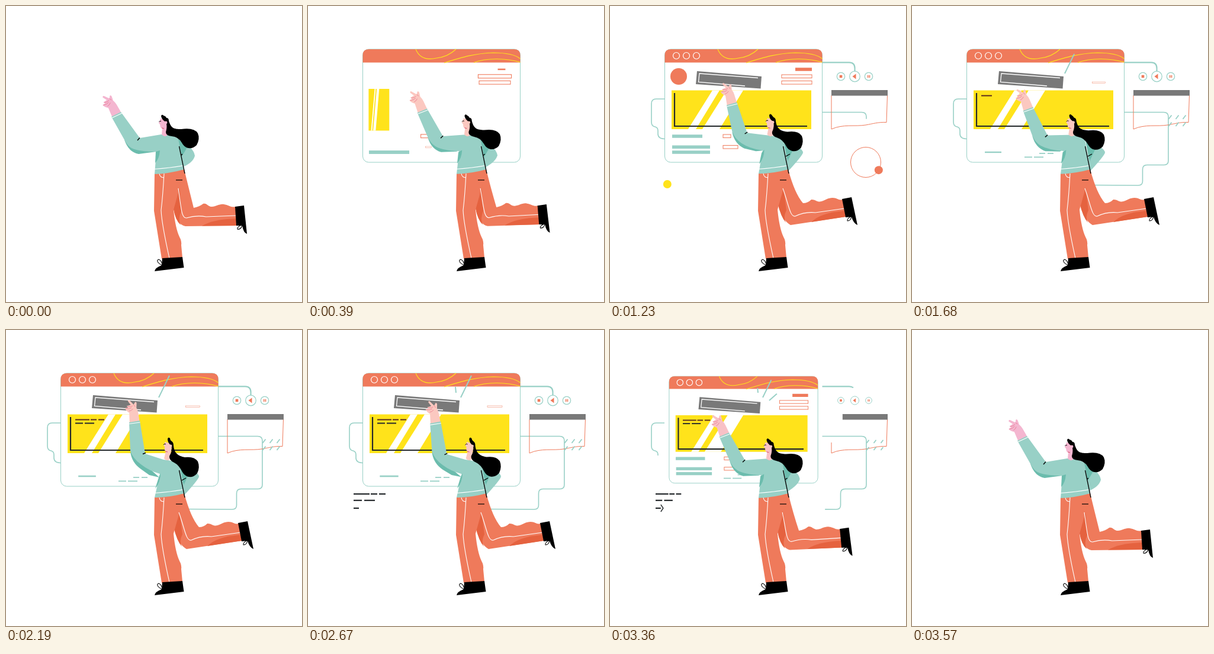
Recreate the animation shown at these times as an HTML page. Size 500 by 500 pixels, loop 3630 ms.

```html
<!DOCTYPE html>
<html lang="en">
<head>
<meta charset="utf-8">
<title>Page builder</title>
<style>
html, body { margin: 0; width: 100%; height: 100%; overflow: hidden; background: #fff; }
svg { display: block; width: 100vw; height: 100vh; }
</style>
</head>
<body>
<svg id="stage" viewBox="0 0 500 500" fill="none"></svg>
<script>
const LOOP = 3630, STEP = 30;
const ORANGE = '#ef7a5b', RUST = '#e5623f', TEAL = '#98d0c6', DEEP = '#6bbcad',
  YELLOW = '#ffe31b', GREY = '#797979', INK = '#24282b';
const stage = document.getElementById('stage');

// Timing
const clamp = x => Math.max(0, Math.min(1, x));
const mix = (a, b, p) => a + (b - a) * p;
const span = (t, a, b) => clamp((t - a) / (b - a));
const smooth = (t, a, b) => { const x = span(t, a, b); return x * x * (3 - 2 * x); };
const pop = (t, start, dur = 200) => {
  const x = span(t, start, start + dur) - 1;
  return x <= -1 ? 0 : 1 + 2.7 * x ** 3 + 1.7 * x ** 2;
};
const leave = (t, start = 3300) => 1 - smooth(t, start, start + 210);
const keys = (t, list) => {
  let i = 0;
  while (i < list.length - 2 && t >= list[i + 1][0]) i++;
  const [a, b] = [list[i], list[i + 1]];
  return mix(a[1], b[1], smooth(t, a[0], b[0]));
};
// Page widgets pop up, fold away, and pop up again
const pulse = (t, start, rest = 0) => {
  const back = pop(t, start + 2748);
  const first = pop(t, start) * (1 - smooth(t, 1260, 1560));
  return Math.max(first, back, t > 1260 ? rest : 0);
};

// Drawing
const fill = (d, c) => `<path d="${d}" fill="${c}"/>`;
const line = (d, c, w = 1.1, p = 1) => p <= 0 ? '' :
  `<path d="${d}" stroke="${c}" stroke-width="${w}"` +
  (p < 1 ? ` pathLength="1" stroke-dasharray="${p} 2"` : '') + '/>';
const dot = (x, y, r, attrs) => r <= 0 ? '' : `<circle cx="${x}" cy="${y}" r="${r}" ${attrs}/>`;
const scaled = (x, y, sx, sy, body) => sx <= 0.001 || sy <= 0.001 ? '' :
  `<g transform="translate(${x} ${y}) scale(${sx} ${sy}) translate(${-x} ${-y})">${body}</g>`;
const bar = (cx, cy, w, h, s, attrs) => scaled(cx, cy, s, s,
  `<rect x="${cx - w / 2}" y="${cy - h / 2}" width="${w}" height="${h}" ${attrs}/>`);
const morph = (a, b, p) => {
  const to = b.match(/-?\d+(\.\d+)?/g);
  let i = 0;
  return a.replace(/-?\d+(\.\d+)?/g, n => mix(+n, +to[i++], p).toFixed(2));
};
// Dashes typed one after another: [x1, x2] pairs on a row
const typed = (y, dashes, p, c, w) => dashes.map(([a, b], i) => {
  const q = clamp(p * dashes.length - i);
  return q ? line(`M${a},${y}H${mix(a, b, q)}`, c, w) : '';
}).join('');

function header(t) {
  const lights = [112, 129, 146].map((x, i) =>
    dot(x, 84, 5.5 * pop(t, 430 + i * 60), 'stroke="#fff" stroke-width="1.2"')).join('');
  return fill('M92.5,95.5V83Q92.5,73 102.5,73H348.5Q358.5,73 358.5,83V95.5Z', ORANGE) +
    line('M182,73C189,90 204,91 217,88Q236,86 250,73', YELLOW) +
    line('M230,96C262,86 282,80 313,79Q346,79 358.5,89', YELLOW) +
    line('M280,95.5C302,87 336,88 358.5,95', YELLOW) + lights;
}

function banner(t) {
  const sx = smooth(t, 293, 693);
  const art = fill('M104,142.5H340V208H104Z', YELLOW) +
    fill('M173,142.5H185L145,208H132Z', '#fff') + fill('M197,142.5H225L185,208H156Z', '#fff');
  return scaled(102.1, 175.3, sx, mix(1.09, 1, sx), art) +
    line('M333,203H109V147', INK, 2.2, smooth(t, 690, 960)) +
    typed(151.5, [[117, 141], [143, 153], [156, 166]], span(t, 1620, 1860), '#5a2c1c', 2) +
    typed(157.5, [[117, 130], [133, 149]], span(t, 1860, 2040), INK, 2);
}

function widgets(t) {
  const outline = `fill="#fff" stroke="${ORANGE}" stroke-width="1"`;
  const solid = `fill="${TEAL}"`;
  const rest = mix(0.43, 0.49, span(t, 1560, 2670));
  return dot(116, 119, 14 * pop(t, 540) * (1 - smooth(t, 1290, 1530)), `fill="${ORANGE}"`) +
    bar(327, 107, 28, 5.5, pulse(t, 367), `fill="${ORANGE}"`) +
    bar(315.5, 118.8, 51, 5.5, pulse(t, 274), outline) +
    bar(315.5, 129.3, 51, 5.5, pulse(t, 225, rest), outline) +
    bar(197.5, 219.8, 13, 5.5, pulse(t, 240), outline) +
    bar(203.5, 238.2, 25, 5.5, pulse(t, 370), outline) +
    bar(130.5, 220, 51, 5.5, pulse(t, 440), solid) +
    bar(137, 238.2, 64, 5.5, pulse(t, 400), solid) +
    bar(137, 247, 64, 5.5, pulse(t, 240, rest), solid) +
    typed(249, [[215, 225], [229, 239]], span(t, 1380, 1530), TEAL, 1.8) +
    typed(255.3, [[190, 203], [206, 222]], span(t, 1440, 1620), TEAL, 1.8);
}

function slab(t) {
  return scaled(200, 125, pop(t, 480, 260), pop(t, 480, 260),
    fill('M147,110L256,119L254.5,139.5L145,132Z', GREY) +
    line('M250,121.5L151,114L149.5,128.5L228,135', '#fff', 1.3));
}

function page(t) {
  const s = smooth(t, 60, 240) * leave(t, 3330);
  const frame = `<rect x="92.5" y="73" width="266" height="191" rx="10" fill="#fff" stroke="${TEAL}"/>`;
  return scaled(225.5, 168.5, s, s, frame + header(t) + banner(t) + widgets(t) + slab(t));
}

function cables(t) {
  const off = leave(t);
  return line('M92,157H78Q70,157 70,165V196Q70,203 76,204Q81,205 81,211V216Q81,224 92,224.5', TEAL, 1.6,
      smooth(t, 570, 780) * off) +
    line('M358.5,95.3H404Q413.5,95.3 413.5,105V110', TEAL, 2.2, smooth(t, 540, 720) * off) +
    line('M358.5,179.5H425Q433,179.5 433,187V261Q433,268.5 426,268.5H397Q389.5,268.5 389.5,276V296Q389.5,303 382,303L300,302.5',
      TEAL, 1.6, smooth(t, 1080, 1530) * off);
}

function player(t) {
  const ring = `fill="#fff" stroke="${TEAL}" stroke-width="1.2"`;
  const icons = [
    [390, 6.7, 'M387.7,116.7h4.6v4.6h-4.6Z'],
    [413.5, 8.8, 'M409.5,119L415.5,114.5V123.5Z'],
    [437, 6.7, 'M434.9,116.7h1.6v4.6h-1.6ZM437.7,116.7h1.6v4.6h-1.6Z']
  ];
  return icons.map(([x, r, d], i) => {
    const s = pop(t, 570 + (i % 2 ? 0 : 40)) * leave(t);
    return scaled(x, 119, s, s, dot(x, 119, r, ring) + fill(d, ORANGE));
  }).join('');
}

function panel(t) {
  const off = leave(t);
  let marks = '';
  for (let i = 0; i < 6; i++) {
    const x = 433.5 + (i % 3) * 12, y = i < 3 ? 191 : 203;
    marks += line(`M${x},${y}l5,-6.5`, TEAL, 1.8, smooth(t, 1260 + i * 40, 1380 + i * 40) * off);
  }
  return line('M468.5,151L467,196.5C452,196 444,199 432,201C414,204 394,199 374,208V151', ORANGE, 1,
      smooth(t, 600, 900) * off) + marks +
    scaled(469, 147, smooth(t, 550, 700) * off, 1, fill('M374,142H469V151.5H374Z', GREY));
}

function extras(t) {
  const away = 1 - smooth(t, 1230, 1530);
  const s = pop(t, 450) * away, a = (-53 + (t - 810) * 0.2) * Math.PI / 180;
  const moon = dot(432 + 25.5 * Math.cos(a), 264 + 25.5 * Math.sin(a), 7, `fill="${ORANGE}"`);
  const off = leave(t);
  return scaled(432, 264, s, s, dot(432, 264, 25.5, `stroke="${ORANGE}" stroke-width="1"`) + moon) +
    dot(105 - 22 * smooth(t, 1110, 1400), 301, 7 * pop(t, 570) * away, `fill="${YELLOW}"`) +
    line('M258,114L276,77', TEAL, 2, smooth(t, 1560, 1710) * off) +
    line('M250,106L249,96', TEAL, 2, smooth(t, 2580, 2670) * off) +
    line('M269,119L285,105', TEAL, 2, smooth(t, 2700, 2850) * off) +
    (off < 0.05 ? '' : scaled(77, 290, off, 1,
      typed(277, [[77, 104], [106, 117], [120, 131]], span(t, 2190, 2400), INK, 2.2) +
      typed(287.8, [[77, 91], [95, 113]], span(t, 2400, 2580), INK, 2.2) +
      typed(301, [[77, 88]], span(t, 2580, 2690), INK, 2.2) +
      line('M88,295L93,301L88,307', INK, 1.8, smooth(t, 2760, 2940))));
}

function legs(k) {
  const m = (a, b) => morph(a, b, k);
  return fill(m('M270,282L301,276Q309,309 317,341Q327,339 333,334C339,332 341,339 348,339S360,334 368,335S380,341 388,339L389,371L303,372Q289,370 283,343L290,308Z',
      'M270,282L301,276Q312,317 326,333Q334,333 340,327C346,326 350,332 357,330S368,324 376,324S386,329 393,327L398,356L305,370Q291,362 284,337L290,308Z'), ORANGE) +
    fill(m('M293,306L283,343Q286,362 295,370Q290,360 296,346Z', 'M293,306L284,335Q288,355 297,366Q292,357 298,345Z'), RUST) +
    fill(m('M331,371.5Q350,360 389,359L389,371Z', 'M340,365Q356,349 396,346L398,356Z'), RUST) +
    fill('M251,283L301,276L292,312L283,344Q286,375 293,390Q297,397 296,404L298,425L263,427L250,346Z', ORANGE) +
    line('M267,283Q265,320 262,345Q263,368 276,426', '#fff') +
    line('M259,283Q260,290 267,290', '#fff') +
    line(m('M291,308C296,340 296,359 305,358Q322,353 338,356L389,354', 'M292,308C302,336 304,357 313,355Q330,347 347,349L396,342'), '#fff') +
    line('M287,294H298', '#000', 1.2) +
    fill('M264,426L298,424L300.5,442L251,448Q252,442 263,438Z', '#000') +
    line('M264,438C255,434 254,429 258,428Q263,430 264,438', '#000') +
    fill(m('M387,339L402,337L407,385Q401,383 399,371L389,371Z', 'M392,326L408,323L418,370Q411,367 408,356L398,357Z'), '#000') +
    line(m('M399,370C393,371 390,375 391,377Q397,378 399,370', 'M408,355C403,357 400,361 401,363Q407,363 408,355'), '#000');
}

function body(k, p) {
  const m = (a, b) => morph(a, b, p);
  return fill(morph('M290,225Q317,238 319,253Q316,265 298,272Z', 'M294,230Q326,238 326,248Q324,254 301,279Z', k), TEAL) +
    fill(morph('M289,222L306,239L296,256Z', 'M293,227L309,243L300,262Z', k), DEEP) +
    fill(m('M200,226Q207,247 224,250L254,246L256,236Z', 'M210,205Q212,224 228,235Q242,245 259,249L261,236Z'), DEEP) +
    fill(m('M178,187L194,179L226,223L262,217Q280,217 291,224L301,276Q276,283 251,284L254,246Q225,246 212,240Q205,236 200,226Z',
      'M208,156L226,153L235,209L266,219Q282,220 294,228L301,276Q276,283 251,283L260,243Q242,238 228,227Q214,217 210,204Z'), TEAL) +
    fill(m('M253,246L260,244Q259,258 252,265Z', 'M258,249L261,242Q261,257 252,268Z'), DEEP) +
    line('M250.5,275.5Q278,273.5 300,269.5', '#fff', 1.2) +
    line(m('M179,189L196,181', 'M208,158.5L226.5,156'), '#fff', 1.2) +
    line(m('M222,227L226,222.5', 'M231,209.5L236,207.5'), '#000', 1.4) +
    line('M292.5,237L302,283', '#000', 1.3) +
    line(morph('M296,252L298,250', 'M297,254L304,250', k), '#000', 1.2);
}

function head(p, skin) {
  const m = (a, b) => morph(a, b, p);
  return fill(m('M261,190L258,198L260,200L261,205L264,207L263,217Q267,222 272,219L274,193Z',
      'M269,189L266,195L268,197L268,203L270,205L267,217Q271,222 276,219L281,193Z'), skin) +
    fill(m('M262,186Q263,182 266,185Q270,186 271,189Q275,189 275,194C279,207 284,208 296,208Q318,205 324,215Q328,224 322,235C314,243 303,242 297,231Q291,221 280,220Q270,219 270,213Q273,203 270,196Q263,192 262,186Z',
      'M273,184Q274,180 277,183Q277,186 280,188Q283,190 283,195C284,209 292,213 302,215Q318,213 324,222Q328,232 323,242C315,252 303,249 298,240Q292,228 284,224Q275,220 276,213Q282,203 279,195Q273,191 273,184Z'), '#000') +
    dot(mix(270, 278, p), mix(197, 196, p), 2.4, `fill="${skin}"`) +
    line(m('M258.5,196Q260,193 262,195', 'M266,194Q268,191 270,193'), '#000', 1) +
    line(m('M263,206L267,207', 'M269,205L273,206'), '#d84c68', 1);
}

function hand(p, skin) {
  const x = mix(186, 217, p), y = mix(182, 154, p), turn = mix(-28, -7, p);
  return `<g transform="translate(${x} ${y}) rotate(${turn})" stroke-linejoin="round">` +
    fill('M-8.5,2L-7,-15Q-13,-20 -13,-24L-8,-24L-10,-27L-3,-28L-7,-35Q-6,-38 -4,-36L2,-28L5,-32Q8,-32 7,-28L6,-22Q8,-17 8,-13L8.5,1Z', skin) +
    line('M-12,-23Q-6,-21 -2,-23M-9,-26Q-3,-24 0,-26M-7,-18Q-3,-18 0,-21M2,-28L4,-24', '#e8748c', 0.7) + '</g>';
}

function draw(t) {
  const reach = keys(t, [[0, 0], [270, 0.06], [390, 0.22], [810, 1], [960, 1], [1530, 0.2], [1680, 0.32],
    [2130, 1], [2400, 1], [2670, 0.94], [3120, 0.56], [3540, 0]]);
  const kick = smooth(t, 270, 780) * (1 - smooth(t, 2970, 3540));
  const warm = keys(t, [[210, 0], [390, 1], [600, 1], [780, 0], [1080, 0], [1260, 1], [3270, 1], [3480, 0]]);
  const skin = `rgb(${mix(244, 251, warm)},${mix(182, 200, warm)},${mix(208, 192, warm)})`;
  stage.innerHTML = cables(t) + page(t) + player(t) + panel(t) + extras(t) +
    legs(kick) + hand(reach, skin) + body(kick, reach) + head(reach, skin);
}

const began = performance.now();
let last = -1;
function tick() {
  const now = (performance.now() - began) % LOOP;
  const t = Math.min(Math.floor(now / STEP) * STEP, LOOP - 2 * STEP);
  if (t !== last) draw(last = t);
  requestAnimationFrame(tick);
}
tick();
</script>
</body>
</html>
```
